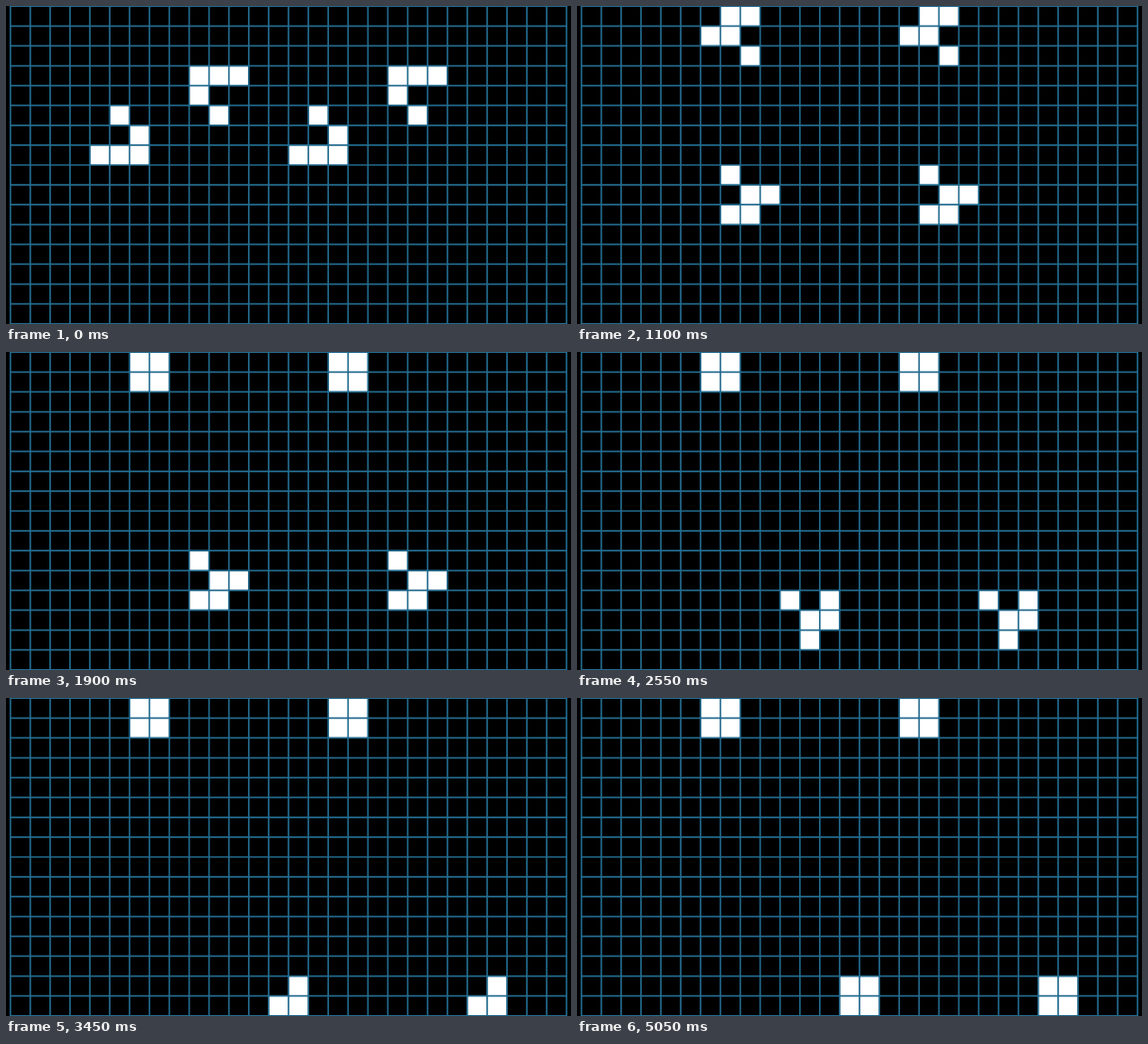
Recreate the animation shown at these times as an HTML page with a canvas. Size 600 px wide and 338 px high, loop 5.1 s.

```html
<!DOCTYPE html>
<html lang="en">
<head>
<meta charset="utf-8">
<title>Game of Life</title>
<style>
  html, body { margin: 0; width: 600px; height: 338px; overflow: hidden; background: #000; }
  canvas { display: block; }
</style>
</head>
<body>
<canvas id="stage" width="600" height="338"></canvas>
<script>
  const COLS = 28, ROWS = 16, STEP = 100, LOOP = 5100;
  const CELL = 600 / (128 / 9) / 2;
  const LEFT = 300 - COLS / 2 * CELL, TOP = 169 - ROWS / 2 * CELL;
  const ctx = document.getElementById('stage').getContext('2d');

  // [row, column] of two gliders; both are repeated ten columns to the right
  const seeds = [
    [3, 9], [3, 10], [3, 11], [4, 9], [5, 10],
    [5, 5], [6, 6], [7, 4], [7, 5], [7, 6]
  ];

  const makeBoard = rule => Array.from({ length: ROWS }, (_, r) =>
    Array.from({ length: COLS }, (_, c) => rule(r, c)));

  // Everything beyond the edge counts as dead
  function neighbours(board, r, c) {
    let n = 0;
    for (let dr = -1; dr <= 1; dr++)
      for (let dc = -1; dc <= 1; dc++)
        if ((dr || dc) && board[r + dr]?.[c + dc]) n++;
    return n;
  }

  const evolve = board => makeBoard((r, c) => {
    const n = neighbours(board, r, c);
    return n === 3 || (n === 2 && board[r][c]);
  });

  const generations = [makeBoard((r, c) =>
    seeds.some(([sr, sc]) => r === sr && (c === sc || c === sc + 10)))];
  while (generations.length < LOOP / STEP) generations.push(evolve(generations.at(-1)));

  const grid = new Path2D();
  for (let c = 0; c <= COLS; c++) {
    grid.moveTo(LEFT + c * CELL, TOP);
    grid.lineTo(LEFT + c * CELL, TOP + ROWS * CELL);
  }
  for (let r = 0; r <= ROWS; r++) {
    grid.moveTo(LEFT, TOP + r * CELL);
    grid.lineTo(LEFT + COLS * CELL, TOP + r * CELL);
  }

  function draw(board) {
    ctx.fillStyle = '#000';
    ctx.fillRect(0, 0, 600, 338);
    ctx.fillStyle = '#fff';
    board.forEach((row, r) => row.forEach((alive, c) => {
      if (alive) ctx.fillRect(LEFT + c * CELL, TOP + r * CELL, CELL, CELL);
    }));
    ctx.strokeStyle = '#236b8e';
    ctx.lineWidth = 1.7;
    ctx.lineCap = 'square';
    ctx.stroke(grid);
  }

  const start = performance.now();
  function tick() {
    const t = (performance.now() - start) % LOOP;
    draw(generations[Math.floor(t / STEP)]);
    requestAnimationFrame(tick);
  }
  tick();
</script>
</body>
</html>
```
